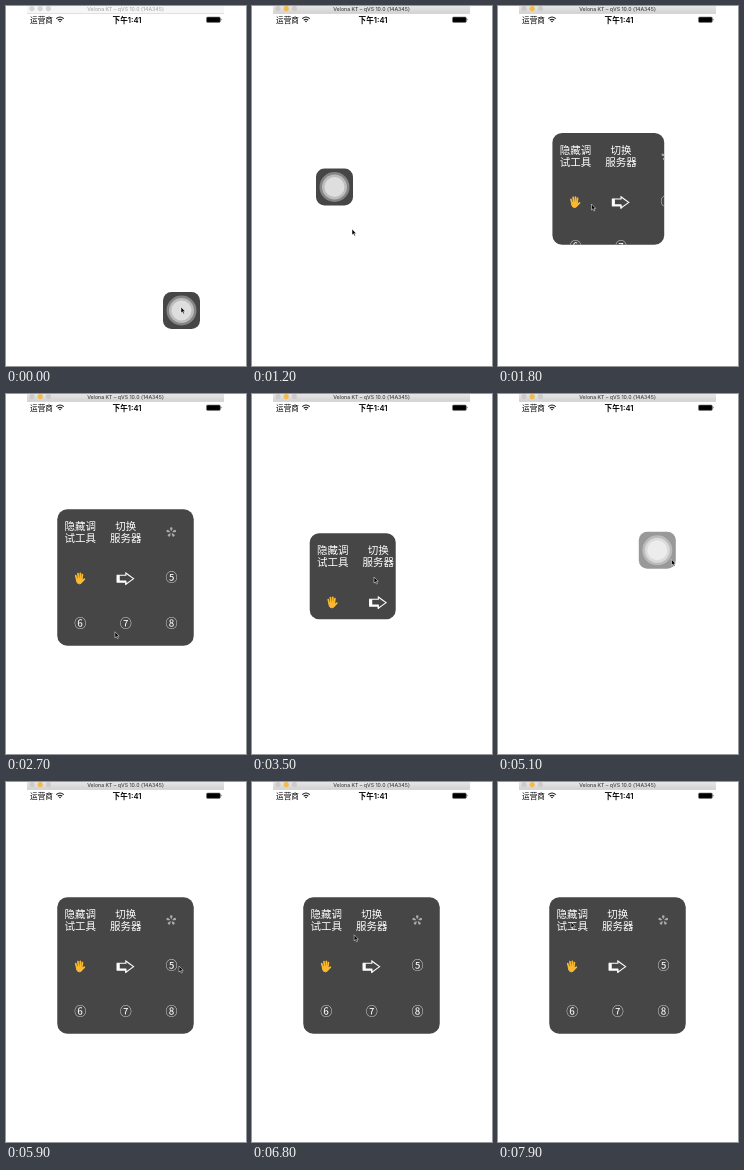
These frames come from a looping animation (240x360 px, 8000 ms). An HTML page:

```html
<!DOCTYPE html>
<html lang="zh">
<head>
<meta charset="utf-8">
<title>Floating menu</title>
<style>
  html, body { margin: 0; width: 100%; height: 100%; overflow: hidden; background: #fff; }
  svg { display: block; width: 240px; height: 360px; }
  text { text-anchor: middle; font-family: Inter, "Noto Sans CJK SC", "Noto Sans CJK", sans-serif; }
  .item { font: 500 10.5px "Noto Sans CJK SC", "Noto Sans CJK", sans-serif; fill: #fff; }
  .digit { font-size: 12px; }
</style>
</head>
<body>
<svg viewBox="0 0 240 360">
  <defs>
    <linearGradient id="chrome" x2="0" y2="1">
      <stop stop-color="#e6e6e6"/><stop offset="1" stop-color="#d2d2d2"/>
    </linearGradient>
    <clipPath id="clip"><rect class="box"/></clipPath>
  </defs>

  <rect id="bar" x="21" width="197" height="7.5"/>
  <path d="M21 7.5H218" stroke="#c4c4c4" stroke-width=".5"/>
  <g id="lights"></g>
  <text id="title" x="119.5" y="4.8" font-size="5.2" font-weight="500">Velona KT – qVS 10.0 (14A345)</text>

  <text x="35.5" y="16.7" font-size="7.6">运营商</text>
  <g fill="none" stroke="#111" stroke-width="1.1">
    <path d="M50.3 12.6Q54 9.4 57.7 12.6M51.8 14.2Q54 12.4 56.2 14.2"/>
    <path d="M52.9 15.1L54 16.4L55.1 15.1Q54 14.3 52.9 15.1Z" fill="#111" stroke="none"/>
  </g>
  <text x="121" y="16.5" font-size="7.6" font-weight="600">下午1:41</text>
  <rect x="200.5" y="11" width="13.8" height="5.4" rx="1.2" stroke="#777" stroke-width=".6"/>
  <path d="M214.9 12.6q1.2 1.1 0 2.2z"/>

  <g id="panel">
    <rect class="box" fill="#464646"/>
    <g id="knob">
      <circle r="15" fill="#858585"/><circle r="12.5" fill="#bcbcbc"/><circle r="10" fill="#dedede"/>
    </g>
    <g clip-path="url(#clip)">
      <g id="menu">
        <g id="flower" transform="translate(114 23)" fill="#aaa"></g>
        <g transform="translate(22.3 69)" fill="none" stroke="#fbb92f" stroke-linecap="round" stroke-width="1.7">
          <path d="M-2.8 1L-3.8 -2.6M-1.1 0L-1.6 -4.6M.7 0L.8 -4.9M2.3 1L2.9 -3.6M2.3 3.4L4.8 .9"/>
          <path d="M-3 1V3Q-2.4 5.6 0 5.6Q2 5.5 2.6 3.4V1Q0 -1 -3 1Z" fill="#fbb92f" stroke-width="1"/>
        </g>
        <g transform="translate(68 69.4)">
          <path d="M-8 -3.4H.6V-5.6Q4 -3 8.4 0Q4 3.2 .6 5.6V3.2H-8Z" fill="none" stroke="#fff" stroke-width="1.1"/>
          <path d="M-8.5 -3.4h3v5.2H1V6.4L0 5.8V3.8H-8.5Z" fill="#fff"/>
        </g>
      </g>
    </g>
  </g>
  <path id="cursor" d="M0 0V6L1.4 4.8L2.4 7L3.4 6.5L2.5 4.4H4.2Z" fill="#000" stroke="#fff" stroke-width=".5"/>
</svg>
<script>
const LOOP = 8000, STEP = 100, SMALL = 37, LARGE = 136.5;
const CELL = 45.6, INSET = 23;
const $ = id => document.getElementById(id);
const boxes = document.querySelectorAll('.box');
const add = (id, html) => $(id).insertAdjacentHTML('beforeend', html);

for (let i = 0; i < 3; i++) add('lights', `<circle cx="${26 + 8.2 * i}" cy="2.6" r="2.6"/>`);
for (let i = 0; i < 5; i++) {
  add('flower', `<path d="M0 -.9Q-2.6 -5 0 -5Q2.6 -5 0 -.9" transform="rotate(${72 * i})"/>`);
}

// Grid cells in reading order; blanks hold drawn icons
['隐藏调 试工具', '切换 服务器', '', '', '', '⑤', '⑥', '⑦', '⑧'].forEach((label, i) => {
  const x = INSET + CELL * (i % 3), y = INSET + CELL * Math.floor(i / 3);
  const kind = label.length === 1 ? 'item digit' : 'item';
  const drop = label.length === 1 ? 4.2 : -2.2;
  label.split(' ').forEach((line, row) =>
    add('menu', `<text class="${kind}" x="${x}" y="${y + drop + 12 * row}">${line}</text>`));
});

// Pointer stops: time, x, y
const stops = [
  [500, 175, 301], [1000, 82, 176], [1200, 100, 223], [1800, 93.5, 198], [2400, 106, 250],
  [3500, 122, 183], [4000, 97, 175], [4400, 174, 150], [5900, 173, 184], [7300, 73, 140]
];

const mix = (a, b, p) => a + (b - a) * p;
const move = (el, x, y) => el.setAttribute('transform', `translate(${x} ${y})`);

function ramp(t, start, length = 400) {
  const p = Math.min(1, Math.max(0, (t - start) / length));
  return p * p * (3 - 2 * p);
}

function pointer(t) {
  let [, x, y] = stops[0];
  for (let i = 1; i < stops.length; i++) {
    const [from] = stops[i - 1], [to, nx, ny] = stops[i];
    const p = ramp(t, from, to - from);
    x = mix(x, nx, p);
    y = mix(y, ny, p);
  }
  return [x, y];
}

function drawChrome(active) {
  $('bar').setAttribute('fill', active ? 'url(#chrome)' : '#f6f6f6');
  $('title').setAttribute('fill', active ? '#404040' : '#ababab');
  [...$('lights').children].forEach((c, i) =>
    c.setAttribute('fill', !active ? '#d6d6d6' : i === 1 ? '#f4bb48' : '#cecaca'));
}

function draw(t) {
  drawChrome(t >= 500);
  const first = ramp(t, 500, 500), second = ramp(t, 4000);
  const open = ramp(t, 1530) - ramp(t, 3298) + ramp(t, 5200);
  const faded = ramp(t, 4100, 300) - ramp(t, 5100, 100);
  const size = mix(SMALL, LARGE, open);
  const cx = mix(mix(mix(175.5, 82.5, first), 159.3, second), 119.5, open);
  const cy = mix(mix(mix(304.5, 181, first), 156.3, second), 183.5, open);
  const x = cx - size / 2, y = cy - size / 2;

  const shape = { x, y, width: size, height: size, rx: mix(8.5, 10, open) };
  for (const box of boxes) for (const key in shape) box.setAttribute(key, shape[key]);
  move($('knob'), cx, cy);
  move($('menu'), x, y);
  $('knob').setAttribute('opacity', Math.max(0, 1 - open * 2.5));
  $('menu').setAttribute('opacity', Math.min(1, open * 2.5));
  $('panel').setAttribute('opacity', 1 - .45 * faded);
  move($('cursor'), ...pointer(t));
}

const start = performance.now();
function tick() {
  const t = (performance.now() - start) % LOOP;
  draw(Math.floor(t / STEP) * STEP);
  requestAnimationFrame(tick);
}
tick();
</script>
</body>
</html>
```
